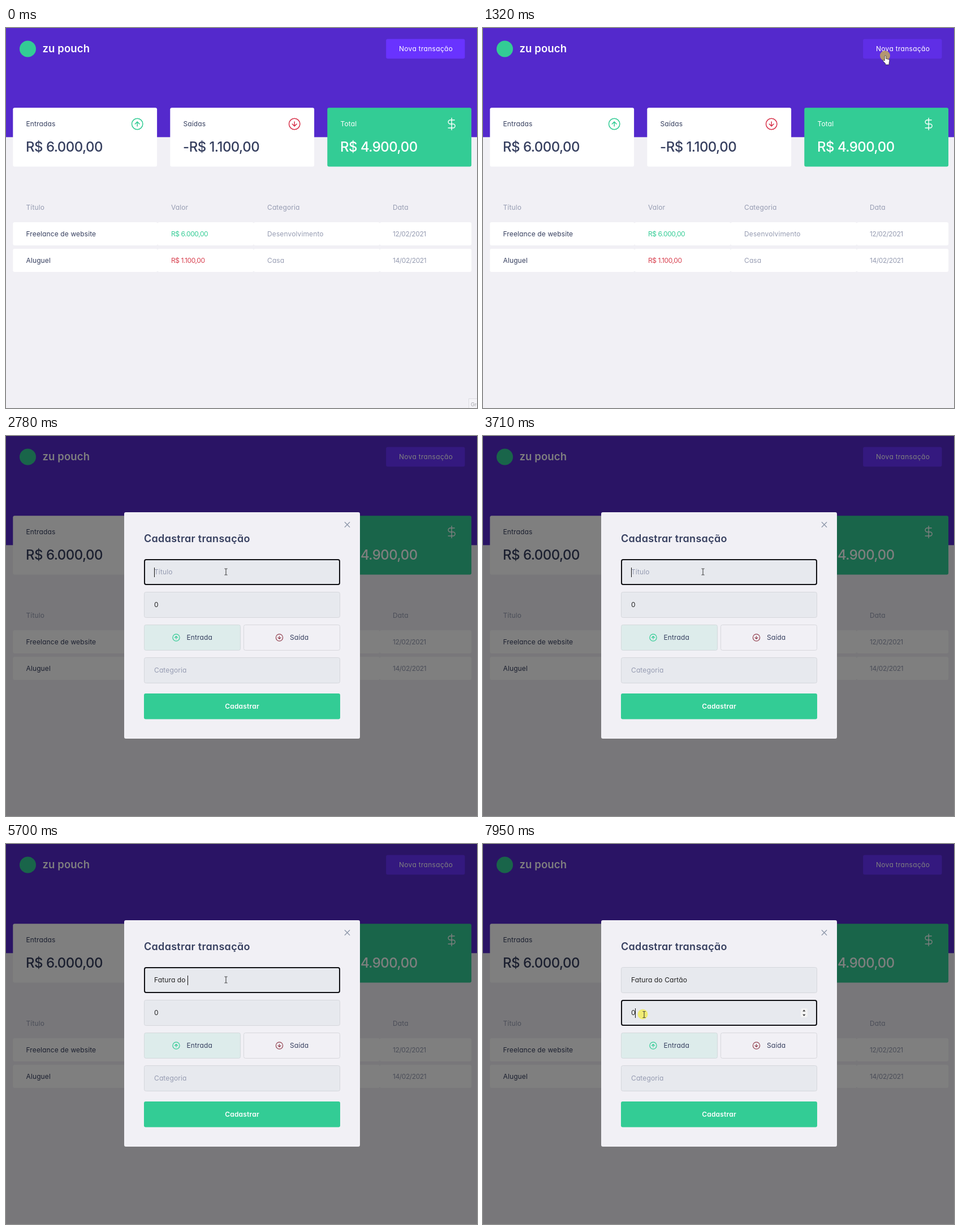
Animation of 833 by 673 pixels, one loop 8000 ms. Source, as an HTML page:

```html
<!DOCTYPE html>
<html lang="pt-BR">
<head>
<meta charset="utf-8">
<title>Controle de transações</title>
<style>
html, body { margin: 0; width: 100%; height: 100%; overflow: hidden; background: #f1f0f5; }
svg { display: block; width: 100vw; height: 100vh; }
text {
  font: 400 12px Inter, "Open Sans", sans-serif; font-feature-settings: "cv11";
  letter-spacing: .12px; fill: #363f5f; white-space: pre;
}
.soft { fill: #969cb2; }
.num { letter-spacing: -.4px; }
.in { fill: #33cc95; }
.out { fill: #d83f4e; }
.sum { font-size: 24px; font-weight: 500; letter-spacing: -.55px; }
.white { fill: #fff; }
.brand { font-size: 18.5px; font-weight: 600; }
.head { font-size: 18px; font-weight: 600; letter-spacing: .3px; }
.wide { letter-spacing: .3px; }
.ink { fill: #222; }
.bold { font-weight: 600; letter-spacing: .2px; }
.tip { font-size: 9px; fill: #a3a3a8; }
.line { fill: none; stroke-linecap: round; stroke-linejoin: round; }
</style>
</head>
<body>
<svg id="stage" viewBox="0 0 833 673" preserveAspectRatio="none"></svg>
<script>
const LOOP = 8000;
const GREEN = '#33cc95', RED = '#d8344c', PAGE = '#f1f0f5';
const $ = id => document.getElementById(id);

const text = (x, y, s, cls = '', more = '') => `<text x="${x}" y="${y}" class="${cls}" ${more}>${s}</text>`;
const rect = (x, y, w, h, fill, more = '') =>
  `<rect x="${x}" y="${y}" width="${w}" height="${h}" rx="3" fill="${fill}" ${more}/>`;
const line = (d, color, width, more = '') =>
  `<path class="line" d="${d}" stroke="${color}" stroke-width="${width}" ${more}/>`;

// Circled arrow; dir is -1 for up and 1 for down
const arrow = (x, y, r, dir, color, width) => {
  const a = r * .4 * dir, b = r * .4;
  return `<circle cx="${x}" cy="${y}" r="${r}" fill="none" stroke="${color}" stroke-width="${width}"/>` +
    line(`M${x} ${y - a}V${y + a}M${x - b} ${y}L${x} ${y + a}L${x + b} ${y}`, color, width);
};

const dollar = (x, y) => line(
  'M0 -10.5V10.5M5 -7H-2.5A3.5 3.5 0 0 0 -2.5 0H2.5A3.5 3.5 0 0 1 2.5 7H-6',
  '#fff', 1.4, `transform="translate(${x} ${y})"`);

const card = (x, label, sum, fill, cls, icon) =>
  rect(x, 141.3, 254.8, 104.2, fill) + text(x + 23.2, 174, label, cls) +
  text(x + 22.8, 219, sum, 'sum ' + cls) + icon;

const cols = [12.3, 268, 438, 661, 823.2];
const row = (y, title, value, kind, group, date) =>
  cols.slice(0, 4).map((x, i) => rect(x, y, cols[i + 1] - x, 41, '#fff')).join('') +
  text(35.5, y + 24.5, title) + text(292, y + 24.5, value, 'num ' + kind) +
  text(462, y + 24.5, group, 'soft') + text(684, y + 24.5, date, 'soft num');

const field = y => rect(244.5, y + .5, 346, 45, '#e7e9ee', 'stroke="#d5d7dc"');

const page = `
  <rect width="833" height="673" fill="${PAGE}"/>
  <rect width="833" height="193.3" fill="#5429cc"/>
  <circle cx="38.5" cy="37" r="14.5" fill="${GREEN}"/>
  ${text(64.5, 43, 'zu pouch', 'brand white')}
  ${rect(672.2, 19.6, 139.3, 34.7, '#6933ff', 'id="open"')}
  ${text(695, 41.3, 'Nova transação', 'white wide')}
  ${card(12.3, 'Entradas', 'R$ 6.000,00', '#fff', '', arrow(232.2, 170, 9.7, -1, GREEN, 1.5))}
  ${card(290.3, 'Saídas', '-R$ 1.100,00', '#fff', '', arrow(510.2, 170, 9.7, 1, RED, 1.5))}
  ${card(568.3, 'Total', 'R$ 4.900,00', GREEN, 'white', dollar(788.2, 170))}
  ${text(35.5, 321.5, 'Título', 'soft')}${text(292, 321.5, 'Valor', 'soft')}
  ${text(462, 321.5, 'Categoria', 'soft')}${text(684, 321.5, 'Data', 'soft')}
  ${row(344, 'Freelance de website', 'R$ 6.000,00', 'in', 'Desenvolvimento', '12/02/2021')}
  ${row(391, 'Aluguel', 'R$ 1.100,00', 'out', 'Casa', '14/02/2021')}
  <g id="hint">${rect(818.5, 656.5, 30, 30, '#f4f3f7', 'stroke="#dddde2" style="rx:0"')}${text(822, 669.5, 'Gravar', 'tip')}</g>`;

const modal = `<g id="modal">
  <rect width="833" height="673" fill="#000" opacity=".5"/>
  ${rect(209, 135, 417, 401, PAGE)}
  ${line('M599.3 152.8L607.7 161.2M607.7 152.8L599.3 161.2', '#8f99ab', 1.4)}
  ${text(244, 188, 'Cadastrar transação', 'head')}
  ${field(218)}${field(276)}${field(392)}
  ${rect(244.5, 334.5, 170, 45, '#ddeceb', 'stroke="#d3d9dc"')}
  ${rect(420.5, 334.5, 170, 45, PAGE, 'stroke="#d7d7dc"')}
  ${arrow(301, 357, 6.1, -1, GREEN, 1.2)}${text(319.5, 361.2, 'Entrada')}
  ${arrow(483.5, 357, 6.1, 1, '#93404f', 1.2)}${text(502, 361.2, 'Saída')}
  ${text(262, 245.2, 'Título', 'soft', 'id="empty"')}
  ${text(262, 245.2, '', 'ink', 'id="typed"')}
  ${text(262, 303.2, '0', 'ink')}
  ${text(262, 419.2, 'Categoria', 'soft')}
  ${rect(244, 456, 347, 45.5, GREEN)}
  ${text(417.5, 482.8, 'Cadastrar', 'white bold', 'text-anchor="middle"')}
  <g id="spin">${rect(562, 291, 12, 16, '#f3f3f3')}
    <path d="M565.2 296.4L567.8 293.4L570.4 296.4ZM565.2 301.8L567.8 304.8L570.4 301.8Z" fill="#333"/></g>
  ${rect(245, 0, 345, 44, 'none', 'id="ring" stroke="#101014" stroke-width="2"')}
  <rect id="caret" width="1" height="17" fill="#111"/>
</g>`;

const pointer = `
  <circle id="press" r="9" fill="#f8ec10" opacity=".55"/>
  <g id="cursor">
    <path id="arrow" d="M0 0V11L2.6 8.7L4.4 12.6L6.1 11.8L4.4 8H7.7Z" fill="#fff" stroke="#222" stroke-width=".6"/>
    <path id="hand" d="M-1.2 9V1.2A1.2 1.2 0 0 1 1.2 1.2V5.4L6 6.5Q7.7 7 7.4 9L6.6 13.5V16H.2V14L-4 9.6Q-4.3 8 -2.8 8.1Z"
      fill="#fff" stroke="#222" stroke-width=".7"/>
    <path id="beam" d="M-2.5 -5.5H-.8L0 -5L.8 -5.5H2.5M0 -5V5M-2.5 5.5H-.8L0 5L.8 5.5H2.5" fill="none" stroke="#333"/>
  </g>`;

$('stage').innerHTML = page + modal + pointer;

const TITLE = 'Fatura do Cartão';
// Each step: time, then values held until the next step
const moves = [
  [0, 'none', 833, 640], [130, 'arrow', 816, 570], [260, 'arrow', 744, 410], [390, 'arrow', 692, 317],
  [660, 'arrow', 699, 240], [790, 'arrow', 707, 125], [920, 'arrow', 711, 56],
  [1060, 'hand', 711.5, 49], [1460, 'arrow', 712, 49.5],
  [1990, 'arrow', 600, 112], [2120, 'arrow', 481, 176],
  [2260, 'arrow', 436, 202], [2390, 'beam', 398, 234], [2520, 'beam', 389, 240.5],
  [7550, 'beam', 388, 240.5], [7690, 'beam', 336, 283], [7820, 'beam', 285, 302]
];
const presses = [[0], [1320, 711, 49], [1460], [2650, 388, 240.5], [2780], [7950, 282.5, 301.5]];
const button = [[0, '#6933ff'], [1060, '#642fef'], [1190, '#5f2ee6'], [1590, '#642fef'], [1720, '#6933ff']];
const typing = [
  [0, 0], [4510, 1], [4640, 2], [4900, 4], [5040, 5], [5170, 6], [5300, 7], [5430, 8], [5570, 9],
  [5700, 10], [5830, 11], [6230, 12], [6490, 13], [6760, 14], [6890, 15], [7020, 16]
];
const blink = [[0, 0], [2650, 1], [3180, 0], [3710, 1], [4240, 0], [4510, 1], [7550, 0], [7950, 1]];
const focus = [[0, 0], [2650, 218], [7950, 276]];

const at = (steps, t) => steps.findLast(s => s[0] <= t);
const show = (id, on) => { $(id).style.display = on ? '' : 'none'; };

function draw(t) {
  show('hint', t < 130);
  show('modal', t >= 1460);
  show('spin', t >= 7690);
  $('open').setAttribute('fill', at(button, t)[1]);

  const count = at(typing, t)[1];
  $('typed').textContent = TITLE.slice(0, count);
  show('empty', !count);

  const top = at(focus, t)[1];
  show('ring', top);
  $('ring').setAttribute('y', top + 1);
  show('caret', at(blink, t)[1]);
  const end = top === 276 ? 7 : count ? Math.round($('typed').getComputedTextLength()) : 0;
  $('caret').setAttribute('x', 262 + end);
  $('caret').setAttribute('y', top + 15);

  const [, kind, x, y] = at(moves, t);
  for (const id of ['arrow', 'hand', 'beam']) show(id, id === kind);
  $('cursor').setAttribute('transform', `translate(${x} ${y})`);

  const [, px, py] = at(presses, t);
  show('press', px);
  if (px) $('press').setAttribute('transform', `translate(${px} ${py})`);
}

const start = performance.now();
function tick() {
  draw((performance.now() - start) % LOOP);
  requestAnimationFrame(tick);
}
tick();
</script>
</body>
</html>
```
